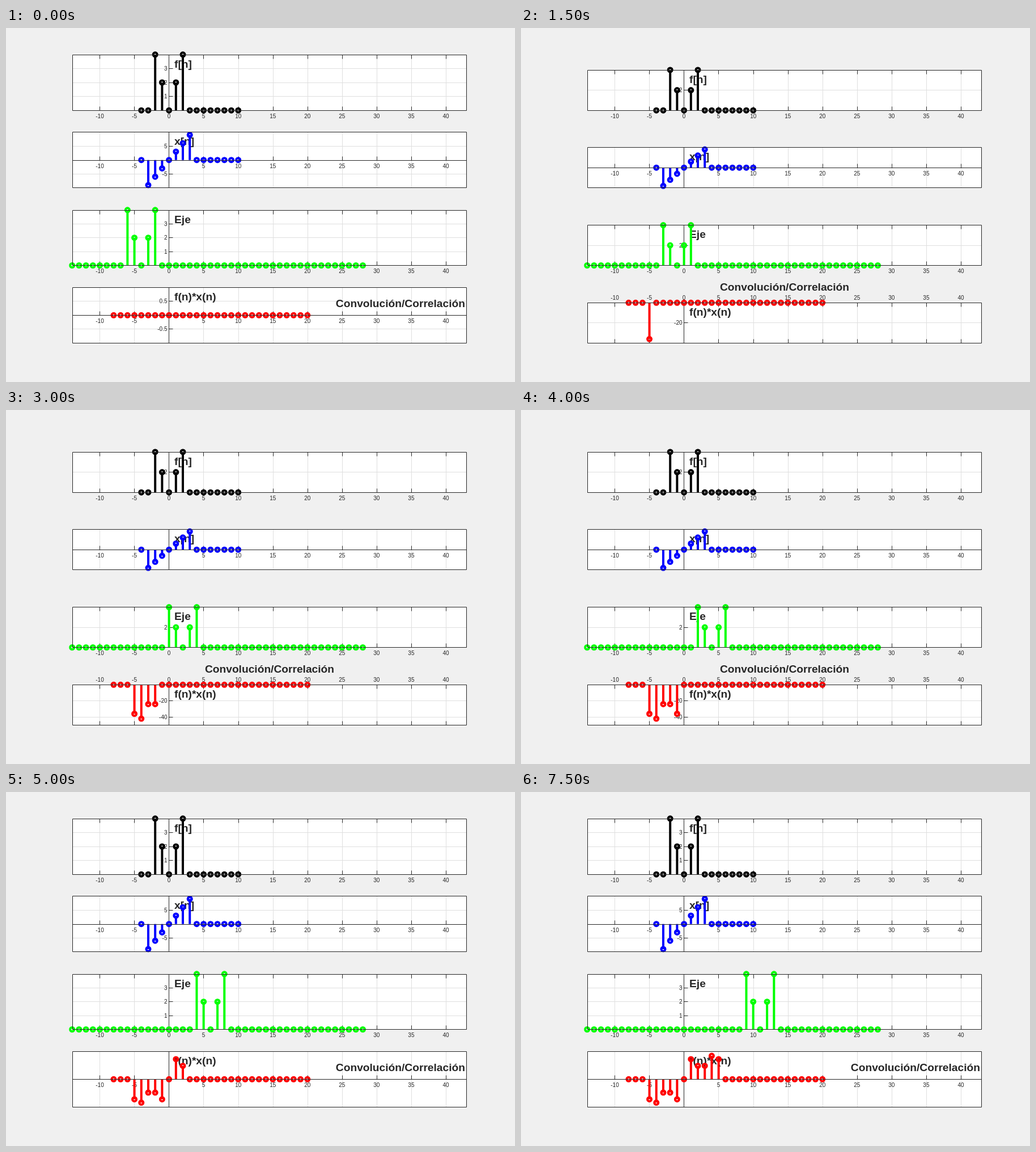
Recreate the animation shown at these times as an HTML page. Size 898 by 624 pixels, loop 8 s.

```html
<!DOCTYPE html>
<html lang="es">
<head>
<meta charset="utf-8">
<title>Convolución</title>
<style>
  html, body { margin: 0; width: 100%; height: 100%; overflow: hidden; background: #f0f0f0; }
  svg { display: block; width: 898px; height: 624px; }
  text { font: 10px "Liberation Sans", Arial, sans-serif; fill: #262626; }
  .title { font-size: 19.2px; font-weight: bold; }
  .mid { text-anchor: middle; }
  .end { text-anchor: end; }
  .grid { stroke: #dfdfdf; fill: none; }
  .axis { stroke: #262626; fill: none; }
  .stems { stroke-width: 4; fill: none; }
</style>
</head>
<body>
<svg id="stage" viewBox="0 0 898 624"></svg>
<script>
const STEP = 500, STEPS = 16;
const LEFT = 117.5, RIGHT = 812.5, UNIT = 12.2096, ZERO = 287.6;
const TICK = 7;
const X_TICKS = [-10, -5, 0, 5, 10, 15, 20, 25, 30, 35, 40];
const BOTTOMS = [145.2, 281.9, 418.5, 555.4];
const TOPS = [46.8, 183.5, 320.8, 457.2];
const SMALL_TOPS = [73.9, 210.5, 347.6, 484.3];

const stage = document.getElementById('stage');
const px = n => ZERO + n * UNIT;
const snap = v => Math.floor(v) + 0.5;
const snapUp = v => snap(v + 0.33);
const range = (a, b) => Array.from({ length: b - a + 1 }, (_, i) => a + i);

const f = n => ({ 1: 2, 2: 4 })[Math.abs(n)] || 0;
const x = n => Math.abs(n) <= 3 ? 3 * n : 0;
const conv = n => range(-2, 2).reduce((sum, m) => sum + f(m) * x(n - m), 0);

const line = (x1, y1, x2, y2) => `M${x1} ${y1}L${x2} ${y2}`;
const path = (cls, d) => `<path class="${cls}" d="${d}"/>`;
const label = (cls, tx, ty, str) => `<text class="${cls}" x="${tx}" y="${ty}">${str}</text>`;

function panel({ top, bottom, lo, hi, ticks, title, color, from, to, value }) {
  const py = v => bottom - (v - lo) / (hi - lo) * (bottom - top);
  const yTop = snapUp(top), yBottom = snap(bottom);
  const yAxis = lo === 0 ? yBottom : hi === 0 ? yTop : snapUp(py(0));
  const inside = lo < 0 && hi > 0;
  const xAxis = snapUp(ZERO);
  let grid = '', marks = '', labels = '';

  for (const n of X_TICKS) {
    const tx = snapUp(px(n));
    grid += line(tx, yTop, tx, yBottom);
    marks += line(tx, yAxis, tx, yAxis + (hi === 0 ? TICK : -TICK));
    if (lo === 0) marks += line(tx, yTop, tx, yTop + TICK);
    if (hi === 0) marks += line(tx, yBottom, tx, yBottom - TICK);
    if (n || !inside) labels += label('mid', px(n), yAxis + (hi === 0 ? -6 : 13.5), n);
  }
  for (const v of ticks) {
    const ty = snap(py(v));
    grid += line(LEFT, ty, RIGHT, ty);
    marks += line(xAxis, ty, xAxis + TICK, ty);
    labels += label('end', 284.5, ty + 3.5, v);
  }
  marks += line(xAxis, yTop, xAxis, yBottom);

  const stems = range(from, to).map(n => {
    const cx = px(n), cy = py(value(n));
    return `<path d="${line(cx, py(0), cx, cy)}"/><circle cx="${cx}" cy="${cy}" r="3.5"/>`;
  }).join('');

  const box = `M${LEFT} ${yTop}H${RIGHT}V${yBottom}H${LEFT}Z`;
  return `<path fill="#fff" d="${box}"/>` + path('grid', grid) + path('axis', marks) +
    labels + label('title', 297, yTop + 22, title) +
    `<g class="stems" stroke="${color}">${stems}</g>` +
    path('axis', box + line(LEFT, yAxis, RIGHT, yAxis));
}

// Limits of the result plot follow the samples computed so far.
function resultAxis(k) {
  if (k < 3) return { lo: -1, hi: 1, ticks: [-0.5, 0.5] };
  if (k < 4) return { lo: -40, hi: 0, ticks: [-20] };
  if (k < 9) return { lo: -50, hi: 0, ticks: [-20, -40] };
  return { lo: -50, hi: 50, ticks: [] };
}

function draw(k) {
  const small = k >= 3 && k < 9;
  const tops = small ? SMALL_TOPS : TOPS;
  const fTicks = small ? [2] : [1, 2, 3];
  const plots = [
    { lo: 0, hi: 4, ticks: fTicks, title: 'f[n]', color: '#000', from: -4, to: 10, value: f },
    { lo: -10, hi: 10, ticks: small ? [] : [-5, 5], title: 'x[n]', color: '#00f', from: -4, to: 10, value: x },
    { lo: 0, hi: 4, ticks: fTicks, title: 'Eje', color: '#0f0', from: -14, to: 28, value: n => f(n - k + 4) },
    { ...resultAxis(k), title: 'f(n)*x(n)', color: '#f00', from: -8, to: 20, value: n => n <= k - 8 ? conv(n) : 0 }
  ];
  const caption = 'Convolución/Correlación';
  stage.innerHTML = plots.map((p, i) =>
    panel({ ...p, top: tops[i], bottom: BOTTOMS[i] })).join('') +
    (small ? label('title mid', 465, 463, caption) : label('title end', 810, 492, caption));
}

let shown = -1;
const start = performance.now();
function tick() {
  const k = Math.floor(Math.max(0, performance.now() - start) / STEP) % STEPS;
  if (k !== shown) draw(shown = k);
  requestAnimationFrame(tick);
}
tick();
</script>
</body>
</html>
```
